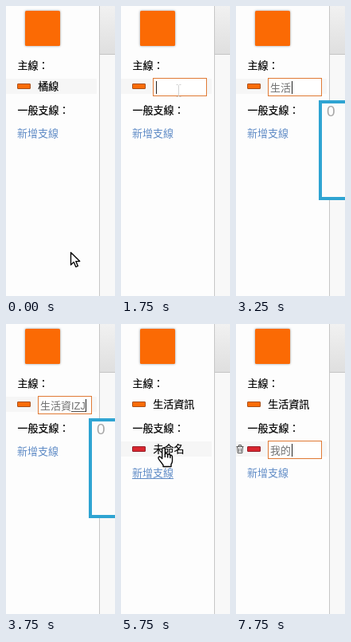
Animation of 137 by 363 pixels, one loop 8 s. Source, as an HTML page:

```html
<!DOCTYPE html>
<html lang="zh-Hant">
<head>
<meta charset="utf-8">
<style>
html, body { margin: 0; width: 100%; height: 100%; overflow: hidden; background: #fdfdfd; }
svg { display: block; }
text { font: 13px "Noto Sans CJK TC", "Noto Sans CJK", "Noto Sans", sans-serif; fill: #000; stroke: #000; stroke-width: 0.2; }
.link { fill: #5f8bc6; stroke: none; }
.field text { fill: #707070; stroke: none; }
.field .code { font-family: "Liberation Sans", Arial, sans-serif; }
.count { font: 19px "Liberation Sans", Arial, sans-serif; fill: #a8a8a8; stroke: none; }
.tile { filter: drop-shadow(0 0 1.5px rgba(0, 0, 0, .4)); }
.ptr { fill: #fff; stroke: #000; stroke-width: 1.35; stroke-linejoin: round; }
</style>
</head>
<body>
<svg width="137" height="363" viewBox="0 0 137 363">
  <defs>
    <linearGradient id="head" x2="0" y2="1">
      <stop stop-color="#f1f1f1"/><stop offset="1" stop-color="#dfdfdf"/>
    </linearGradient>
  </defs>
  <rect width="137" height="363" fill="#fdfdfd"/>
  <rect x="118" width="19" height="363" fill="#f8f8f8"/>
  <rect x="118" width="19" height="60" fill="url(#head)"/>
  <rect x="118" y="60" width="19" height="1" fill="#c4c4c4"/>
  <rect x="117" width="1" height="363" fill="#c6c6c6"/>
  <rect class="tile" x="24" y="6" width="44" height="44" rx="1.5" fill="#fb6a04"/>

  <rect id="shade" x="0" y="91" width="114" height="19" fill="#f6f6f6"/>
  <text x="14.5" y="79">主線：</text>
  <rect x="14.5" y="97.5" width="16" height="6" rx="0.5" fill="#f96c08" stroke="#a8501a"/>
  <text id="main" x="40.3" y="105"></text>
  <text x="14.5" y="135">一般支線：</text>
  <g id="branch">
    <rect x="14.5" y="153.5" width="16" height="6" rx="0.5" fill="#d9262f" stroke="#94202a"/>
    <text id="sub" x="40.5" y="161">未命名</text>
  </g>
  <g id="bin" fill="none" stroke="#555">
    <path d="M0.5 153.5H9.5M3.5 153V151.5H6.5V153M1.5 154L2.2 161.5H7.8L8.5 154M3.7 155.5V160M6.3 155.5V160"/>
  </g>
  <g id="add">
    <text class="link" x="14" y="164">新增支線</text>
    <rect id="line" x="14" y="166" width="52" height="1" fill="#5f8bc6"/>
  </g>

  <g id="field" class="field">
    <rect x="40.5" y="90.5" width="67" height="22" fill="#fff" stroke="#e07a35"/>
    <rect id="mark" x="43" y="94" height="15" fill="#3390ff"/>
    <text id="typed" x="43" y="107"></text>
    <text id="code" class="code" y="107"></text>
    <rect id="under" y="109" height="1" fill="#555"/>
    <rect id="caret" y="94" width="1" height="16" fill="#222"/>
  </g>
  <g id="panel">
    <rect x="106" y="120" width="60" height="121" fill="#fcfcfc" stroke="#2fa4d2" stroke-width="4"/>
    <text class="count" x="114" y="138">0</text>
  </g>

  <g id="arrow" class="ptr">
    <path d="M0.5 0.5V16L4.2 12.6L6.8 18.6L9.4 17.5L6.8 11.6H11.7Z"/>
  </g>
  <g id="hand" class="ptr">
    <path d="M-1.8 13.5V1.7Q-1.8 0 0 0T1.8 1.7V8Q2.2 6.8 3.6 7T5.2 8.8Q5.7 7.7 7 8T8.4 9.8Q9 8.9 10 9.4T11 11.3V16.5Q11 18.6 9.5 20.5V23.5H-0.5V21.5L-5.2 15.4Q-7.5 12.4 -6 11.4T-3 12.3Z"/>
    <path d="M1.8 8V12M5.2 9V12.5M8.4 10V13" fill="none"/>
  </g>
  <g id="beam" fill="none" stroke="#d2d2d2">
    <path d="M-2.5 0.5H-0.5L0.5 1.5L1.5 0.5H3.5M0.5 1.5V14.5M-2.5 15.5H-0.5L0.5 14.5L1.5 15.5H3.5"/>
  </g>
</svg>
<script>
const $ = id => document.getElementById(id);
const LOOP = 8000, EM = 13, CODE_W = 18;
const ROW = 56;           // distance between the two rows
const kinds = ["arrow", "hand", "beam"];

// each step changes only the listed keys
const steps = [
  [0, { ptr: "arrow", x: 81, y: 308, main: "橘線", hover: 0, edit: -1, typed: "", code: "",
        panel: false, branch: false, line: false, bin: false, sel: false }],
  [250, { x: 80, y: 286 }],
  [500, { x: 76, y: 232 }],
  [750, { x: 71, y: 168 }],
  [1000, { ptr: "hand", x: 65.5, y: 106 }],
  [1250, { x: 64.5, y: 100 }],
  [1500, { ptr: "beam", x: 72, y: 98, edit: 0, typed: "橘線", sel: true }],
  [1750, { typed: "", sel: false }],
  [2250, { code: "IZ", panel: true }],
  [2500, { typed: "生", code: "", panel: false }],
  [3000, { ptr: "", code: "IZ", panel: true }],
  [3250, { typed: "生活", code: "" }],
  [3500, { typed: "生活資" }],
  [3750, { code: "IZJ" }],
  [4000, { typed: "生活資訊", code: "", panel: false }],
  [4250, { edit: -1, main: "生活資訊" }],
  [5000, { ptr: "beam", x: 87, y: 134 }],
  [5250, { ptr: "hand", x: 62, y: 156, line: true, hover: -1 }],
  [5500, { x: 53.5, y: 155, branch: true, hover: 1 }],
  [6000, { x: 56, y: 153, line: false, bin: true }],
  [6250, { x: 60, y: 152 }],
  [6750, { ptr: "", edit: 1, typed: "未命名", sel: true }],
  [7000, { typed: "", sel: false }],
  [7500, { typed: "我" }],
  [7750, { typed: "我的" }]
];

const show = (id, on) => $(id).style.display = on ? "" : "none";
const move = (id, x, y) => $(id).setAttribute("transform", `translate(${x} ${y})`);
const set = (id, key, value) => $(id).setAttribute(key, value);

function render(t) {
  const s = Object.assign({}, ...steps.filter(([at]) => at <= t).map(([, change]) => change));
  show("shade", s.hover >= 0);
  move("shade", 0, s.hover > 0 ? ROW : 0);
  $("main").textContent = s.main;
  show("main", s.edit !== 0);
  show("branch", s.branch);
  show("sub", s.edit !== 1);
  show("bin", s.bin);
  show("line", s.line);
  move("add", 0, s.branch ? 27 : 0);

  show("field", s.edit >= 0);
  move("field", 0, s.edit > 0 ? ROW : 0);
  const end = 43 + s.typed.length * EM;
  const codeW = s.code.length * CODE_W / 3;
  $("typed").textContent = s.typed;
  $("typed").style.fill = s.sel ? "#fff" : "";
  $("code").textContent = s.code;
  set("code", "x", end);
  set("under", "x", end);
  set("under", "width", codeW);
  set("mark", "width", s.sel ? end - 43 : 0);
  set("caret", "x", end + codeW + (s.code ? 0 : 1));
  show("caret", !s.sel);
  show("panel", s.panel);

  for (const k of kinds) {
    show(k, s.ptr === k);
    move(k, s.x, s.y);
  }
}

function tick(now) {
  render(now % LOOP);
  requestAnimationFrame(tick);
}
render(0);
requestAnimationFrame(tick);
</script>
</body>
</html>
```
